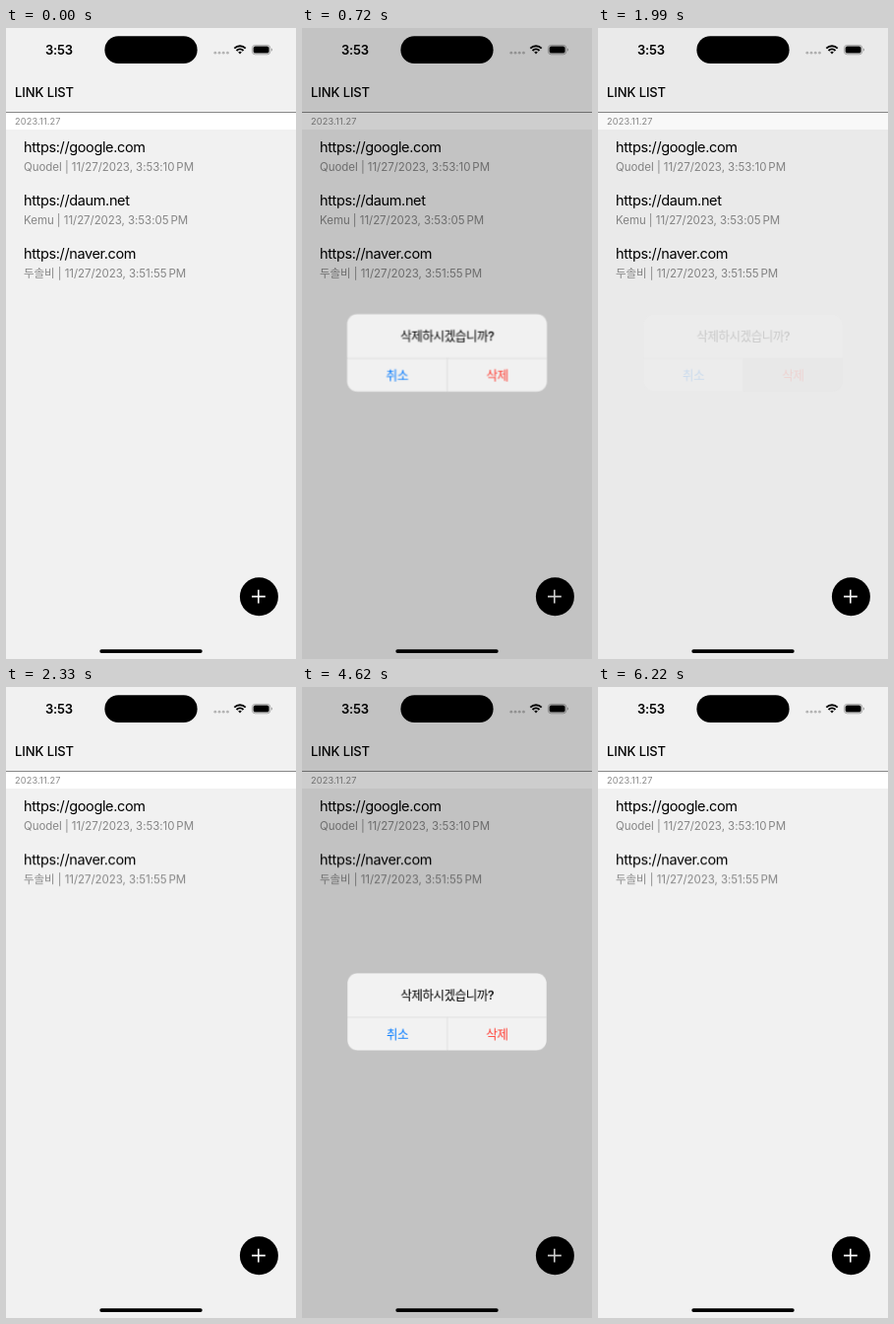
Animation, 295 px wide and 640 px high, one loop 8000 ms. Source, as an HTML page:

```html
<!DOCTYPE html>
<html lang="ko">
<head>
<meta charset="utf-8">
<title>Link list</title>
<style>
  html, body { margin: 0; width: 100%; height: 100%; overflow: hidden; background: #f1f1f1; }
  svg { display: block; width: 295px; height: 640px; }
  text { font-family: Inter, "Noto Sans CJK KR", "Noto Sans CJK", sans-serif; }
  .clock { font-size: 13px; font-weight: 600; letter-spacing: -.2px; }
  .head { font-size: 13px; font-weight: 500; letter-spacing: -.1px; }
  .date { font-size: 9.2px; letter-spacing: .14px; fill: #8a8a8a; }
  .url { font-size: 14.5px; letter-spacing: -.37px; }
  .info { font-size: 11.5px; letter-spacing: -.05px; fill: #868686; }
  .ask { font-size: 12.6px; font-weight: 500; letter-spacing: -.5px; text-anchor: middle; }
  .btn { font-size: 12.6px; font-weight: 500; letter-spacing: -.4px; text-anchor: middle; }

  .second, .third, .dim, .alert, .pressed { animation: 8s step-end infinite; }
  .second { animation-name: remove; }
  .third { animation-name: move-up; }
  .dim { animation-name: fade; }
  .alert { animation-name: fade, zoom; transform-origin: 147.5px 329.5px; }
  .pressed { animation-name: press; }

  @keyframes remove { 0% { opacity: 1; } 29.125%, 100% { opacity: 0; } }
  @keyframes move-up { 0% { transform: none; } 29.125%, 100% { transform: translateY(-53.8px); } }
  @keyframes fade {
    0%, 26.25%, 77.75%, 100% { opacity: 0; }
    6.25%, 53.5% { opacity: .57; }
    7.625%, 54.875% { opacity: .88; }
    9%, 56.25% { opacity: .98; }
    10.375%, 57.75% { opacity: 1; }
    22%, 72% { opacity: .97; }
    23.5%, 73.625% { opacity: .5; }
    24.875%, 75% { opacity: .14; }
    76.375% { opacity: .03; }
  }
  @keyframes zoom {
    0%, 6.25%, 53.5% { transform: scale(1.083); }
    7.625%, 54.875% { transform: scale(1.022); }
    9%, 56.25% { transform: scale(1.004); }
    10.375%, 57.75%, 100% { transform: none; }
  }
  @keyframes press {
    0%, 26.25%, 77.75%, 100% { opacity: 0; }
    22%, 72% { opacity: 1; }
  }
</style>
</head>
<body>
<svg viewBox="0 0 295 640">
  <defs>
    <clipPath id="card"><rect x="46.2" y="290.3" width="202.6" height="78.4" rx="10.5"/></clipPath>
  </defs>
  <rect width="295" height="640" fill="#f1f1f1"/>

  <!-- status bar -->
  <text class="clock" x="40" y="26.5">3:53</text>
  <rect x="100.4" y="8.3" width="94.2" height="27.7" rx="13.85"/>
  <g fill="#b4b4b4">
    <circle cx="212.8" cy="25.2" r="1.4"/><circle cx="217" cy="25.2" r="1.4"/>
    <circle cx="221.2" cy="25.2" r="1.4"/><circle cx="225.4" cy="25.2" r="1.4"/>
  </g>
  <g fill="none" stroke="#000" stroke-width="1.9">
    <path d="M232.3 20.6a8.1 8.1 0 0 1 11.4 0"/>
    <path d="M234.5 23a5 5 0 0 1 7 0"/>
  </g>
  <path d="M236.2 24.6a2.6 2.6 0 0 1 3.6 0L238 26.6z"/>
  <rect x="250.4" y="17.4" width="18.4" height="9.4" rx="3" fill="none" stroke="#999" stroke-width=".8"/>
  <rect x="251.6" y="18.6" width="16" height="7" rx="1.9"/>
  <path d="M269.8 20.5a1.7 1.7 0 0 1 0 3.2z" fill="#999"/>

  <!-- header -->
  <text class="head" x="9" y="69.8">LINK LIST</text>
  <rect y="85" width="295" height="1" fill="#888"/>
  <rect y="86" width="295" height="17" fill="#fff"/>
  <text class="date" x="9" y="98.3">2023.11.27</text>

  <!-- list -->
  <g>
    <text class="url" x="18" y="126.3">https://google.com</text>
    <text class="info" x="18" y="144.9">Quodel | 11/27/2023, 3:53:10<tspan dx="2">PM</tspan></text>
  </g>
  <g class="second">
    <text class="url" x="18" y="180.1">https://daum.net</text>
    <text class="info" x="18" y="198.7">Kemu | 11/27/2023, 3:53:05<tspan dx="2">PM</tspan></text>
  </g>
  <g class="third">
    <text class="url" x="18" y="233.9">https://naver.com</text>
    <text class="info" x="18" y="252.5">두솔비 | 11/27/2023, 3:51:55<tspan dx="2">PM</tspan></text>
  </g>

  <!-- add button -->
  <circle cx="257.4" cy="576.8" r="19.5"/>
  <path d="M250 576.6h13.8M256.8 569.8v13.6" stroke="#fff" stroke-width="1.6"/>

  <g class="dim"><rect width="295" height="640" fill-opacity=".195"/></g>
  <rect x="95.3" y="630.2" width="104.4" height="3.8" rx="1.9"/>

  <!-- dialog -->
  <g class="alert">
    <g clip-path="url(#card)">
      <rect x="46" y="290" width="203" height="79" fill="#f2f2f2"/>
      <path d="M46 335h203M147.8 335v34" stroke="#d6d6d6" stroke-width=".6"/>
      <rect class="pressed" x="147.5" y="335" width="102" height="34" fill="#dadada"/>
    </g>
    <text class="ask" x="147.6" y="317.1">삭제하시겠습니까?</text>
    <text class="btn" x="97" y="356.6" fill="#007aff">취소</text>
    <text class="btn" x="198.4" y="356.6" fill="#ff3b30">삭제</text>
  </g>
</svg>
</body>
</html>
```
